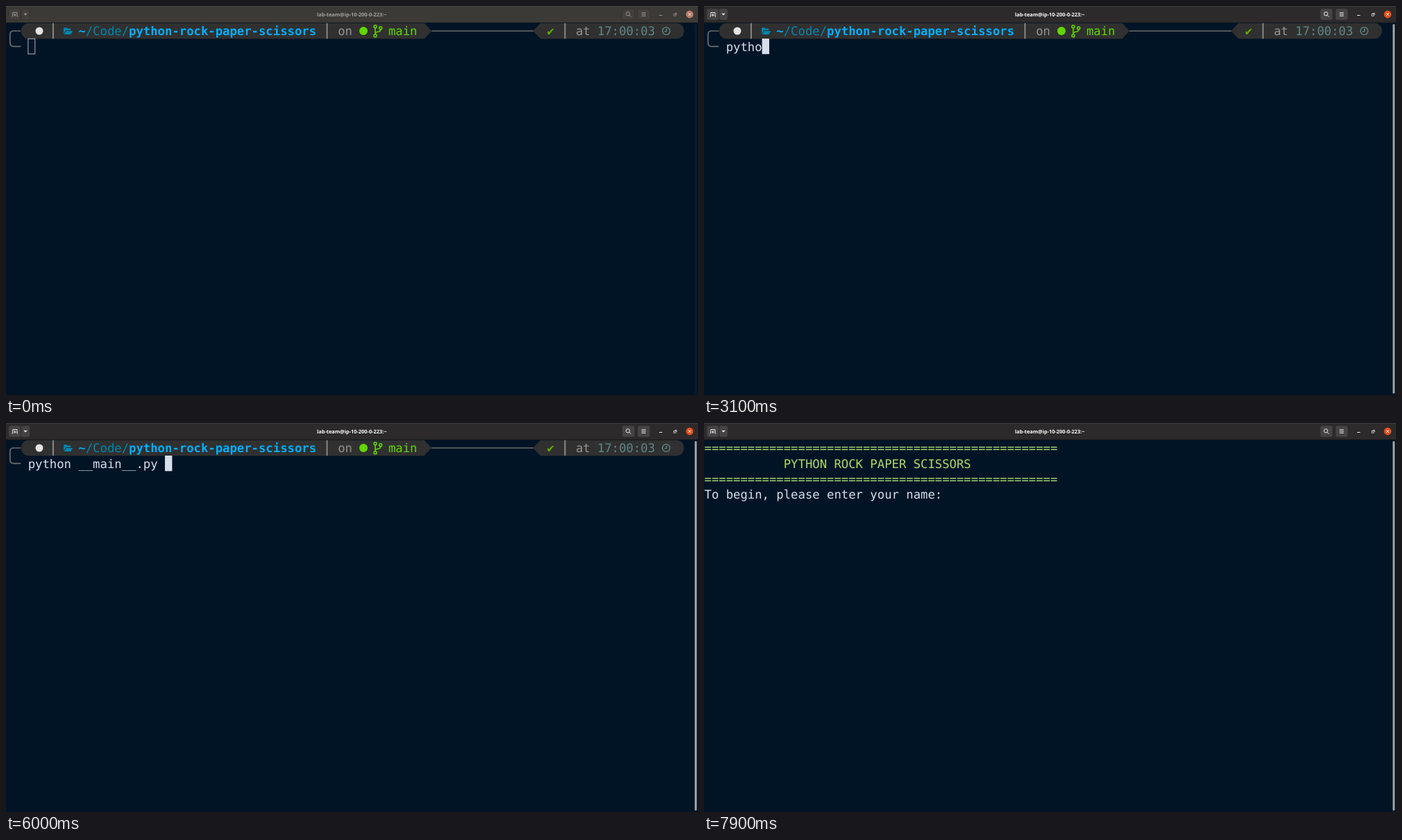
An HTML page that plays this animation: 997 px wide and 561 px high, repeating every 8 s.

```html
<!DOCTYPE html>
<html lang="en">
<head>
<meta charset="utf-8">
<title>Terminal</title>
<style>
html, body { margin: 0; width: 100%; height: 100%; overflow: hidden; background: #011426; }
svg { display: block; --bar: #2c2a2b; --btn: #454344; --edge: #3a3839; --ink: #fff; --close: #e4501e; --cross: #fff; --thumb: #a3a5a7; }
svg.idle { --bar: #3b3a37; --btn: #423f3c; --edge: #34322f; --ink: #a5a29d; --close: #b87e6a; --cross: #e6dcd6; --thumb: #0c1d2f; }
text { font: 17.25px "DejaVu Sans Mono", monospace; fill: #d6deeb; white-space: pre; text-rendering: geometricPrecision; }
.title { font: bold 7.4px "Noto Sans", "Open Sans", sans-serif; fill: var(--ink); }
.bar { fill: var(--bar); }
.btn { fill: var(--btn); stroke: var(--edge); stroke-width: .6; }
.icon { fill: none; stroke: var(--ink); }
.pill { fill: #303030; }
.frame { fill: none; stroke: #6c6c6c; stroke-width: 1.7; }
.sep { stroke: #949494; stroke-width: 1.7; }
.grey { fill: #949494; }
.blue { fill: #0087af; }
.anchor { fill: #00afff; font-weight: bold; }
.green { fill: #5fd700; }
.ok { fill: #5faf00; }
.branch { fill: none; stroke: #5fd700; stroke-width: 1.6; }
.teal { fill: #5f8787; }
.clock { fill: none; stroke: #5f8787; stroke-width: 1.4; }
.lime { fill: #addb67; }
</style>
</head>
<body>
<svg id="screen" width="997" height="561" viewBox="0 0 997 561">
  <rect width="997" height="561" fill="#011426"/>

  <rect class="bar" width="997" height="24"/>
  <path d="M0 .5H997" stroke="#fff" stroke-opacity=".08"/>
  <path d="M0 24.3H997" stroke="#111418" stroke-width=".8"/>
  <rect class="btn" x="4" y="4" width="17" height="16" rx="2.5"/>
  <rect class="btn" x="22" y="4" width="12" height="16" rx="2.5"/>
  <rect class="btn" x="888" y="4" width="17.5" height="16" rx="2.5"/>
  <rect class="btn" x="910" y="4" width="17.5" height="16" rx="2.5"/>
  <g class="icon" stroke-width=".9">
    <path d="M8.5 15H9.7V9.5H16V15H17M12.8 11V15M11 13H14.6"/>
    <circle cx="896" cy="11.3" r="2.7"/>
    <path d="M898 13.4L900.3 15.7M915.7 9.7H921.7M915.7 12H921.7M915.7 14.3H921.7M941 13.5H945.5"/>
    <path d="M962 11.5H965V14.3H962ZM963.3 10.3H966.2V13" stroke-width=".7"/>
  </g>
  <path d="M25.4 10.7H30.6L28 13.5Z" fill="var(--ink)"/>
  <text class="title" x="498.3" y="14.6" text-anchor="middle">lab-team@ip-10-200-0-223:~</text>
  <circle cx="985" cy="12" r="5.4" fill="var(--close)"/>
  <path d="M983.2 10.2L986.8 13.8M986.8 10.2L983.2 13.8" stroke="var(--cross)"/>
  <rect x="992.3" y="26" width="3" height="533" rx="1.5" fill="var(--thumb)"/>

  <g id="shell">
    <path class="frame" d="M21.3 36H11Q5.8 36 5.8 41V53Q5.8 58.3 11 58.3H21.3M613 36H760"/>
    <path class="pill" d="M33 24.8H602.5L613 36L602.5 47.2H33A11.2 11.2 0 0 1 33 24.8ZM770 24.8H965.7A11.2 11.2 0 0 1 965.7 47.2H770L759.3 36Z"/>
    <path class="sep" d="M67.9 24.8V47.2M462.5 24.8V47.2M805.4 24.8V47.2"/>
    <circle cx="48" cy="36" r="5.5" fill="#e4e4e4"/>
    <path class="blue" d="M83 40V32.2Q83 31.2 84 31.2H87L88.4 32.6H92.3Q93.2 32.6 93.2 33.5V35H86.2ZM83.6 41L86.8 36H96.2L93.3 41Z"/>
    <text class="blue" data-cell="10 0"><tspan class="anchor">~</tspan>/Code/<tspan class="anchor">python-rock-paper-scissors</tspan></text>
    <text class="grey" data-cell="46 0">on</text>
    <circle class="green" cx="515" cy="36" r="6"/>
    <g class="branch">
      <circle cx="532" cy="29.7" r="2"/>
      <circle cx="532" cy="42.7" r="2"/>
      <circle cx="539.7" cy="31.7" r="2"/>
      <path d="M532 31.7V40.7M539.7 33.7Q539.7 37 535.7 37.2Q532 37.5 532 40.5"/>
    </g>
    <text class="green" data-cell="53 0">main</text>
    <text class="ok" data-cell="75 0">✔</text>
    <text class="grey" data-cell="79 0">at</text>
    <text class="teal" data-cell="82 0">17:00:03</text>
    <g class="clock"><circle cx="951.2" cy="36" r="5.4"/><path d="M951.6 32.6V36.6H948.6"/></g>
    <text id="command" data-cell="3 1"></text>
  </g>

  <g id="game">
    <text class="lime rule" data-cell="0 0"></text>
    <text class="lime" data-cell="11 1">PYTHON ROCK PAPER SCISSORS</text>
    <text class="lime rule" data-cell="0 2"></text>
    <text data-cell="0 3">To begin, please enter your name:</text>
  </g>

  <rect id="cursor"/>
</svg>
<script>
const CELL = 10.385, ROW = 22.33, LEFT = .5, TOP = 24.7, BASE = 17.5;
const FOCUS = 500, START = 6850;
const $ = id => document.getElementById(id);
const set = (el, attrs) => Object.entries(attrs).forEach(([k, v]) => el.setAttribute(k, v));

// Place text on the terminal's character grid
document.querySelectorAll('[data-cell]').forEach(el => {
  const [col, row] = el.dataset.cell.split(' ');
  set(el, { x: LEFT + col * CELL, y: TOP + row * ROW + BASE });
});
document.querySelectorAll('.rule').forEach(el => el.textContent = '='.repeat(49));

// Each key press: time and the number of characters then on the line
const line = 'python __main__.py ';
const keys = [[2600, 1], [2780, 2], [2870, 3], [2960, 4], [3050, 5], [3250, 6], [3450, 7],
  [5500, 8], [5650, 9], [5850, line.length]];

function draw() {
  const t = performance.now() % 8000;
  const focused = t >= FOCUS, playing = t >= START;
  const [pressed, count] = keys.filter(k => k[0] <= t).pop() || [FOCUS, 0];
  const since = playing ? START : pressed;

  $('screen').classList.toggle('idle', !focused);
  $('shell').style.display = playing ? 'none' : '';
  $('game').style.display = playing ? '' : 'none';
  $('command').textContent = line.slice(0, count);

  const [col, row] = playing ? [34, 3] : [3 + count, 1];
  const inset = focused ? 0 : .25;
  set($('cursor'), {
    x: LEFT + col * CELL + inset,
    y: TOP + row * ROW + inset,
    width: CELL - 2 * inset,
    height: ROW - 2 * inset,
    fill: focused ? '#d6deeb' : 'none',
    stroke: focused ? 'none' : '#aab3c0'
  });
  $('cursor').style.display = !focused || (t - since) % 1200 < 600 ? '' : 'none';
  requestAnimationFrame(draw);
}
draw();
</script>
</body>
</html>
```
